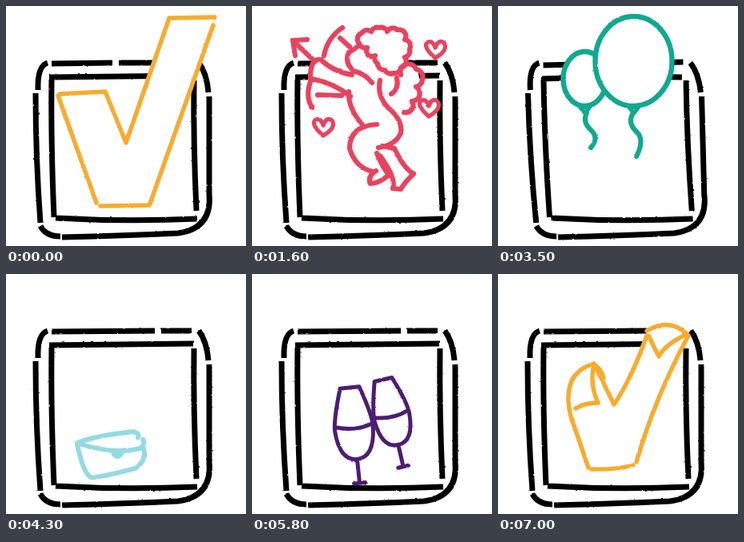
An HTML page for the animation above (7100 ms loop, 300 by 300 pixels).

```html
<!DOCTYPE html>
<html lang="en">
<head>
<meta charset="utf-8">
<style>
html, body { margin: 0; width: 100%; height: 100%; overflow: hidden; background: #fff; }
svg { display: block; width: 100vw; height: 100vh; }
path { vector-effect: non-scaling-stroke; }
#art { stroke-linecap: round; stroke-linejoin: round; }
</style>
</head>
<body>
<svg viewBox="0 0 300 300">
  <filter id="rough" filterUnits="userSpaceOnUse" x="0" y="0" width="300" height="300" color-interpolation-filters="sRGB">
    <feTurbulence id="noise" type="fractalNoise" baseFrequency=".3"/>
    <feDisplacementMap in="SourceGraphic" scale="2.2" xChannelSelector="R" yChannelSelector="G"/>
  </filter>
  <g filter="url(#rough)">
    <path id="box" fill="none" stroke="#000" stroke-width="7"/>
    <g id="art"></g>
  </g>
</svg>
<script>
const STEP = 100, STEPS = 71;
const $ = id => document.getElementById(id);
const pink = '#e9425f', orange = '#f9ab2e', teal = '#0fa98f', blue = '#94dae2', purple = '#4c1d73';

const draw = (d, color, width, fill = 'none') => `<path d="${d}" fill="${fill}" stroke="${color}" stroke-width="${width}"/>`;
const mask = d => draw(d, 'none', 0, '#fff');
const group = (transform, body) => `<g transform="${transform}">${body}</g>`;
const zoom = (s, x, y) => `translate(${x} ${y}) scale(${s}) translate(${-x} ${-y})`;

// Chain of outward bumps, clockwise through "x,y" points.
const scallop = (points, r = 9) => 'M' + points.split(' ').join(` A${r} ${r} 0 0 1 `);

// Three hand-drawn variants: the top line breaks elsewhere, the last one leans.
function boxPath(variant) {
  const gap = [137, 190, 157][variant];
  const outerTop = variant < 2 ? `M57 72L${gap - 4} 71M${gap + 4} 71L232 71` : 'M57 74L232 70';
  const innerTop = variant < 2 ? 'M54 89L234 87' : `M54 91L${gap - 2} 88M${gap + 2} 88L230 89`;
  return outerTop + innerTop +
    'M52 71Q39 75 40 105M37 109Q37 190 43 271M43 275Q50 288 68 288' +
    'M70 289Q150 287 215 284Q258 278 254 235L254 113M241 71Q251 84 253 108' +
    'M57 92Q56 170 60 264M62 265Q150 270 239 266M235 93Q234 170 238 256';
}

function check(rel) {
  if (rel > 3 && rel < 10) {
    return mask('M65 109L124 107 150 171 204 15 261 14 180 248 115 249Z') +
      draw('M67 110L124 107 150 171 204 15 261 14M259 24L180 247M179 249L118 250M113 246L65 112', orange, 5.4);
  }
  return mask('M90 177Q78 128 120 112L145 163 186 73Q212 56 238 76L170 240 114 244Z') +
    draw('M113 242L91 178Q78 124 120 112M145 163L120 112M145 163Q166 133 186 77M186 71Q214 54 236 75' +
      'M238 77Q196 155 173 235M169 239Q146 245 117 244M97 168Q108 161 125 161M125 161Q114 137 120 113Q129 118 132 130' +
      'M188 77L201 103Q210 87 235 76', orange, 5.4);
}

const heart = (x, y) => `M${x} ${y + 11}Q${x - 17} ${y - 4} ${x - 9} ${y - 9}Q${x - 3} ${y - 11} ${x} ${y - 2}Q${x + 4} ${y - 13} ${x + 11} ${y - 8}Q${x + 17} ${y + 1} ${x} ${y + 11}`;

function arrow(rel) {
  const away = Math.max(0, rel - 6) * 17;
  if (rel > 8) return draw('M16 27L24 33M38 45L48 51', pink, 5);
  return group(`translate(${-away} ${-away * .7})`, draw('M54 62L51 43 69 42M52 44L76 67', pink, 6));
}

function cupid(rel) {
  if (rel >= 10) {
    const hair = scallop('132,76 130,52 153,48 171,56 185,70 176,84', 12);
    return mask('M91 91L108 62 126 55 140 41 185 68 197 93 185 137Q198 170 174 180L203 218 160 200Q125 202 122 170L134 156 111 130 114 113Z') +
      draw(hair + 'M150 56Q151 73 134 75M132 76Q123 88 129 101Q114 94 100 87Q87 87 93 98Q104 112 116 114' +
        'M108 62Q100 74 101 82M88 111Q77 121 76 136' +
        'M170 93Q184 86 197 93Q195 115 184 137M170 93Q153 114 166 136M112 114Q109 141 132 157' +
        'M143 152Q122 157 122 173Q126 206 160 200M167 139Q189 144 189 160Q185 181 158 182Q156 192 165 198' +
        'M168 180Q183 185 203 217Q194 222 180 206L162 199', pink, 6.2) +
      (rel < 15 ? arrow(rel) : '');
  }
  const hair = scallop('134,47 137,34 149,32 159,27 169,32 182,30 191,42 197,54 191,64 186,77 176,84 166,80 157,72 154,62 146,62 144,52 134,47', 8);
  const wing = scallop('186,86 205,79 213,92 205,101 208,115 200,119 200,129 190,133', 10);
  const bob = rel % 3 - 1;
  return mask('M75 92L74 67 92 50 113 27 137 34 160 27 191 42 197 60 187 80 207 79 212 107 190 135Q190 165 165 177L200 208 181 228 160 190 168 215 148 222Q120 200 124 160L137 148 123 115Z') +
    draw(hair + wing + 'M134 49Q127 55 121 58Q116 69 124 78M126 81Q141 84 150 96' +
      'M73 93Q72 65 86 67Q101 82 125 86M75 91Q104 97 123 113M113 27Q94 40 90 62M110 40L122 51M75 127Q66 112 74 92M82 111L112 112' +
      'M121 107Q120 128 137 147M181 90Q184 104 174 110M160 93Q156 112 170 127Q189 143 186 159Q179 174 158 177' +
      'M156 148Q122 150 122 178Q129 202 151 207M156 184Q164 203 171 211Q159 222 148 222Q144 213 155 206' +
      'M163 175L178 178Q189 202 202 210Q191 220 186 229L176 228Q181 216 160 187', pink, 6.2) +
    draw(heart(229, 55 + bob) + heart(221, 126 - bob) + heart(89, 152 + bob), pink, 5.2) + arrow(rel);
}

const balloon = (x, y, rx, ry) => {
  const end = y + ry;
  return draw(`M${x} ${y - ry}A${rx} ${ry} 0 0 1 ${x + 3} ${end}A${rx} ${ry} 0 0 1 ${x} ${y - ry}Z`, teal, 6.4, '#fff') +
    draw(`M${x - 4} ${end + 2}l12 -1 -6 8Z`, teal, 5);
};
const string = (x, y, length) => draw(`M${x} ${y}q-6 12 5 22t0 ${length}`, teal, 6);
const balloons = () => balloon(107, 91, 27, 34) + string(111, 133, 22) + balloon(168, 69, 48, 56) + string(168, 135, 31);

const letter = () => mask('M81 197L178 179 190 210 180 237 105 252 88 240Z') +
  draw('M81 197Q102 186 165 179Q181 178 178 188M81 197Q140 216 181 205Q190 200 186 191' +
    'M81 199Q92 252 106 252Q137 247 174 237Q194 223 186 203M139 214Q146 223 152 213Z', blue, 6);

const glass = () => mask('M-12 0H12Q25 38 24 52Q22 90 0 90Q-22 90 -24 52Q-24 38 -12 0Z') +
  draw('M-12 0H12Q25 38 24 52Q22 90 0 90Q-22 90 -24 52Q-24 38 -12 0M-21 48Q2 55 22 48M0 94V119M-7 120H7', purple, 5);

function glasses(rel) {
  const apart = 22 * Math.sin(Math.max(0, rel - 3) * .6) ** 2;
  return group(`translate(${122 - apart} 142) rotate(${-6 - apart / 3})`, glass()) +
    group(`translate(${164 + apart} 132) rotate(${-13 + apart / 3}) scale(.93)`, glass());
}

// Each act grows out of the box, holds, and sinks back; times in steps.
const acts = [
  { show: check, from: 67, length: 14, grow: 4, sink: 4, peak: 1, x: 148, y: 190 },
  { show: cupid, from: 10, length: 18, grow: 4, sink: 4, peak: 1, x: 148, y: 190 },
  { show: balloons, from: 29, length: 14, grow: 5, sink: 4, peak: 1, x: 148, y: 190 },
  { show: letter, from: 43, length: 10, grow: 3, sink: 7, peak: 2.35, x: 118, y: 264 },
  { show: glasses, from: 55, length: 12, grow: 5, sink: 3, peak: 1.25, x: 150, y: 205 }
];

function scene(step) {
  for (const { show, from, length, grow, sink, peak, x, y } of acts) {
    const rel = (step - from + STEPS) % STEPS;
    if (rel >= length) continue;
    const size = peak * Math.min(1, (rel + 1) / grow, (length - rel) / sink);
    return group(zoom(size, x, y), show(rel));
  }
  return '';
}

let shown = -1;
const start = performance.now();
function tick() {
  const step = Math.floor((performance.now() - start) / STEP) % STEPS;
  if (step !== shown) {
    shown = step;
    const variant = step % 3;
    $('box').setAttribute('d', boxPath(variant));
    $('box').setAttribute('transform', variant === 2 ? 'translate(-2.4) skewX(1.5)' : '');
    $('noise').setAttribute('seed', variant + 2);
    $('art').innerHTML = scene(step);
  }
  requestAnimationFrame(tick);
}
tick();
</script>
</body>
</html>
```
